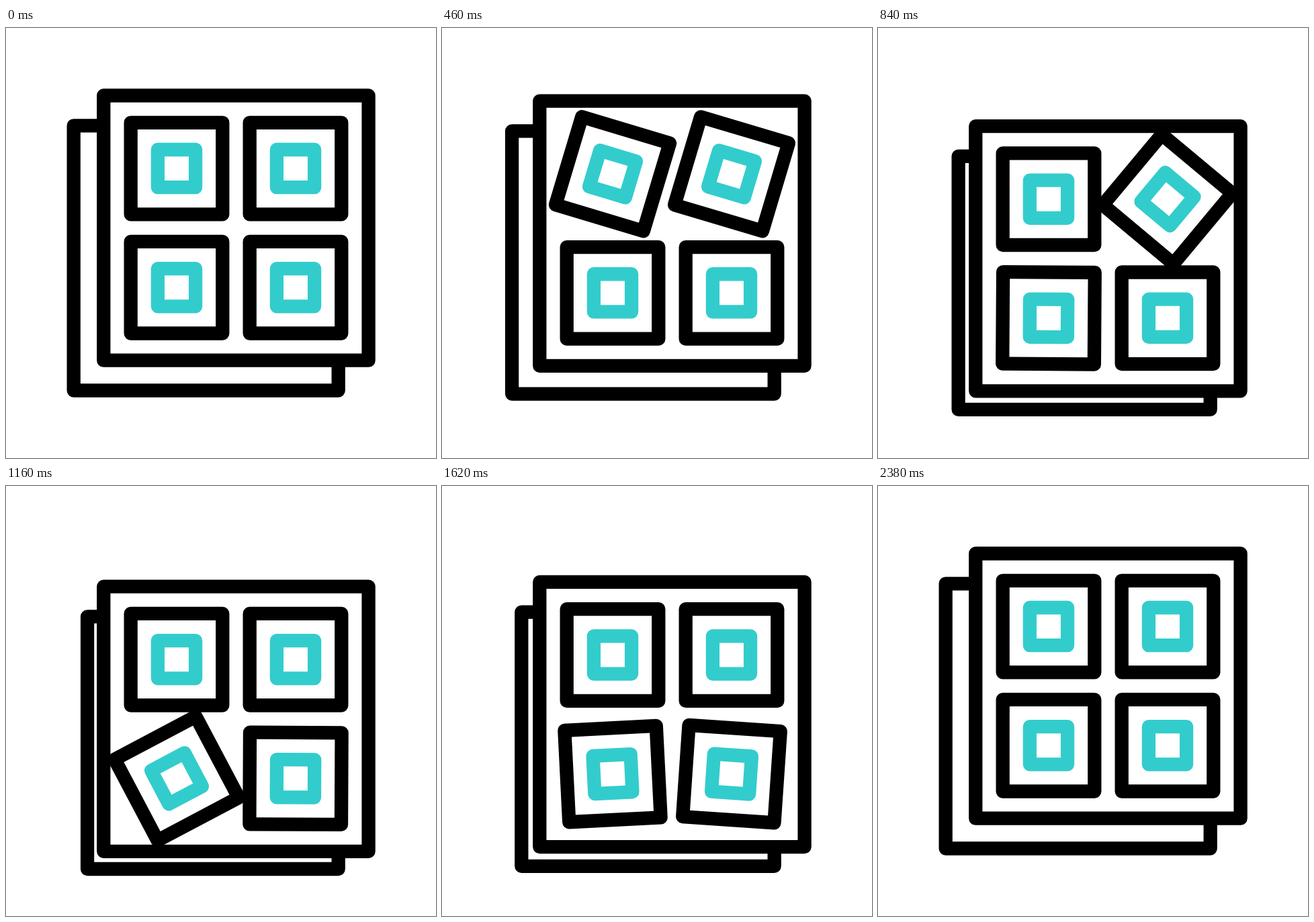
An HTML page with a canvas for the animation above (2400 ms loop, 640 by 640 pixels).

```html
<!DOCTYPE html>
<html lang="en">
<head>
<meta charset="utf-8">
<title>Tiles</title>
<style>
  html, body { margin: 0; width: 100%; height: 100%; overflow: hidden; background: #fff; }
  canvas { display: block; width: 100vmin; height: 100vmin; }
</style>
</head>
<body>
<canvas id="stage" width="640" height="640"></canvas>
<script>
const ctx = document.getElementById('stage').getContext('2d');
const LOOP = 2400;
const HALF = 1187;
const BLACK = '#000';
const TEAL = '#33cccc';

// Each tile makes a half turn between start and end.
const tiles = [
  { x: 254, y: 209.1, start: 0, end: 820 },
  { x: 431, y: 209.1, start: 308, end: 1125 },
  { x: 254, y: 386.2, start: 818, end: 1686 },
  { x: 431, y: 386.2, start: 1140, end: 2075 }
];

const clamp = v => Math.min(1, Math.max(0, v));
const smooth = s => s * s * (3 - 2 * s);

// Equivalent of cubic-bezier(.8, 0, .2, 1).
function steepEase(x) {
  let lo = 0, hi = 1;
  for (let i = 0; i < 24; i++) {
    const s = (lo + hi) / 2, r = 1 - s;
    if (2.4 * s * r * r + 0.6 * s * s * r + s * s * s < x) lo = s;
    else hi = s;
  }
  return smooth((lo + hi) / 2);
}

function box(left, top, right, bottom, color, fill) {
  ctx.beginPath();
  ctx.rect(left, top, right - left, bottom - top);
  if (fill) {
    ctx.fillStyle = fill;
    ctx.fill();
  }
  ctx.strokeStyle = color;
  ctx.stroke();
}

function drawTile(tile, time, drop) {
  const turn = smooth(clamp((time - tile.start) / (tile.end - tile.start)));
  ctx.save();
  ctx.translate(tile.x, tile.y + drop);
  ctx.rotate(Math.PI * turn);
  box(-68.3, -68.3, 68.3, 68.3, BLACK);
  box(-28.1, -28.1, 28.1, 28.1, TEAL);
  ctx.restore();
}

function draw(time) {
  const phase = time < HALF ? time / HALF : 2 - time / HALF;
  const press = steepEase(clamp(phase));
  const drop = 49.1 * press;

  ctx.fillStyle = '#fff';
  ctx.fillRect(0, 0, 640, 640);
  ctx.lineWidth = 20.3;
  ctx.lineJoin = 'round';

  box(100.7 + 20.4 * press, 145.3 + drop, 494.7, 539.5 + 30.5 * press, BLACK);
  box(145.3, 100.5 + drop, 539.6, 494.7 + drop, BLACK, '#fff');
  for (const tile of tiles) drawTile(tile, time, drop);
}

const origin = performance.now();
function frame() {
  draw((performance.now() - origin) % LOOP);
  requestAnimationFrame(frame);
}
frame();
</script>
</body>
</html>
```
